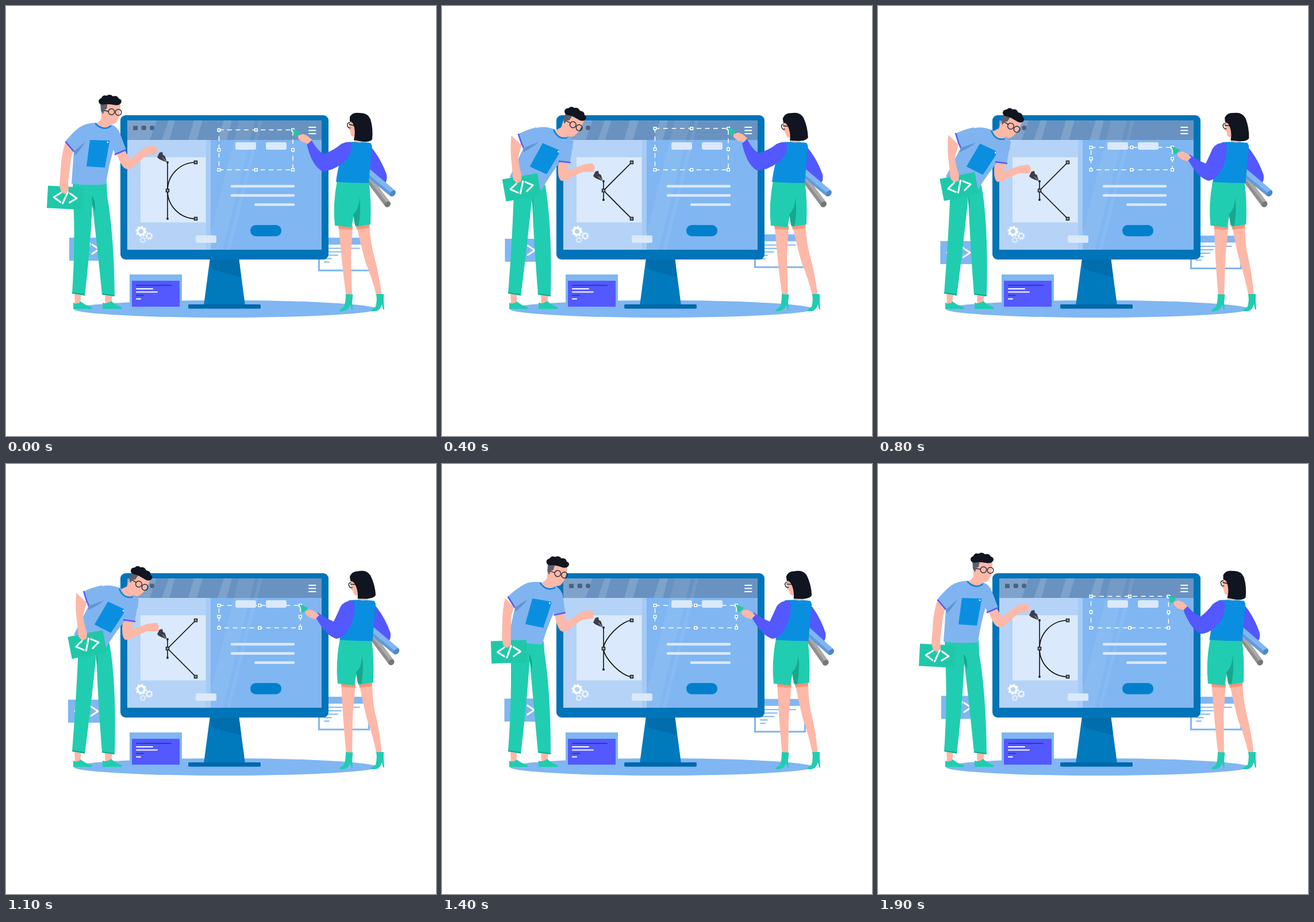
These frames come from a looping animation (748 by 748 pixels, 2000 ms). An HTML page:

```html
<!DOCTYPE html>
<html lang="en">
<head>
<meta charset="utf-8">
<title>Design team at work</title>
<style>
html, body { margin: 0; width: 100%; height: 100%; overflow: hidden; background: #fff; }
svg { display: block; width: 100vw; height: 100vh; }
.sky { fill: #80b6f2; }
.shirt { fill: #80b4f0; }
.pale { fill: #dae9fb; }
.vest { fill: #0a8fe0; }
.violet { fill: #5358ff; }
.teal { fill: #20cdb0; }
.deep { fill: #17a78f; }
.skin { fill: #fdb8a8; }
.shade { fill: #fb9477; }
.ink { fill: #10151f; }
.line { fill: none; stroke-linecap: round; stroke-linejoin: round; }
.white { stroke: #fff; }
.cuff { fill: none; stroke: #5358ff; stroke-width: 2.5; }
.node { fill: #8a97a6; stroke: #14181f; stroke-width: 1.4; }
</style>
</head>
<body>
<svg viewBox="0 0 748 748">
  <defs>
    <clipPath id="glass"><rect x="211" y="199" width="338" height="225"/></clipPath>
    <g id="code" class="line white" stroke-width="3">
      <path d="M-8 -8L-20 0L-8 8M4 -10L-4 10M8 -8L20 0L8 8"/>
    </g>
  </defs>

  <ellipse class="sky" cx="381" cy="527" rx="263" ry="15"/>

  <g>
    <rect class="sky" x="215" y="467" width="91" height="56"/>
    <rect class="violet" x="219" y="478" width="83" height="45"/>
    <path class="line" stroke="#1746b5" stroke-width="2" d="M227 486H287M227 503.500H239"/>
    <path class="line white" stroke-width="2" d="M227 492H255M227 497.500H263M227 509.500H234"/>
  </g>

  <g id="codePanel">
    <rect class="sky" width="57" height="40"/>
    <use href="#code" x="32" y="20"/>
  </g>

  <g id="page">
    <rect x="1.500" y="2" width="87" height="55" fill="#fff" stroke="#80b6f2" stroke-width="3"/>
    <rect class="sky" width="90" height="12"/>
    <path class="line" stroke="#80b6f2" stroke-width="2" d="M11 18.500H72M11 24.500H40M11 30.500H34M11 36.500H23M11 42.500H19"/>
  </g>

  <!-- monitor -->
  <path fill="#0079bd" d="M355 438H405L416 521H344Z"/>
  <path fill="#006dad" d="M355 438H405L409 472L358 458Z"/>
  <rect fill="#0068a8" x="317" y="519" width="126" height="7.500" rx="2"/>
  <rect fill="#0074b8" x="199" y="190" width="362" height="251" rx="9"/>
  <g clip-path="url(#glass)">
    <rect class="sky" x="211" y="199" width="338" height="225"/>
    <rect fill="#b4d3f7" x="211" y="233" width="145" height="191"/>
    <rect fill="#a5caf5" x="348" y="233" width="8" height="191"/>
    <rect fill="#6992c1" x="211" y="199" width="338" height="34"/>
    <g fill="#fff">
      <path opacity=".15" d="M211 199H262L250 233H211ZM283 199H294L284 233H271ZM327 199H342L332 233H317ZM379 199H393L384 233H368Z"/>
      <path opacity=".07" d="M405 199H433L377 424H349ZM440 199H446L390 424H384Z"/>
    </g>
    <g fill="#4d627f">
      <rect x="221" y="208.500" width="8" height="7.500"/>
      <rect x="235.500" y="208" width="8.500" height="8" rx="3"/>
      <circle cx="254" cy="212" r="4"/>
    </g>
    <path class="line white" stroke-width="2" d="M527 211H538.500M527 216.500H538.500M527 222H538.500"/>
    <rect class="pale" x="234" y="263" width="113.500" height="113.500"/>
    <g fill="none" stroke="#fff">
      <g id="gears"></g>
    </g>
    <rect class="pale" x="330" y="399" width="36" height="13" rx="3"/>
    <path class="line" stroke="#dae9fb" stroke-width="4.500" d="M393 313.500H500M393 329.500H500M434 345.500H500"/>
    <rect fill="#0080cc" x="425" y="381" width="54" height="19.500" rx="9.500"/>
  </g>

  <rect id="selection" x="370.500" fill="none" stroke="#fff" stroke-width="1.500" stroke-dasharray="8 6.500"/>
  <rect class="pale" x="399" y="237" width="36" height="13" rx="3"/>
  <rect class="pale" x="452" y="237" width="36" height="13" rx="3"/>
  <g id="handles"></g>

  <path id="curve" class="line" stroke="#111" stroke-width="1.700"/>
  <path id="lever" class="line" stroke="#111" stroke-width="1.600"/>
  <g id="leverEnds" fill="#111"><circle cx="281" r="1.900"/><circle cx="281" r="1.900"/></g>
  <g class="node">
    <rect x="278.500" y="318.500" width="5" height="5"/>
    <rect x="327.500" y="269.500" width="5" height="5"/>
    <rect x="327.500" y="367.500" width="5" height="5"/>
  </g>

  <!-- woman -->
  <g>
    <path class="skin" data-k="hip" d="M578 378L603 378Q602 400 600 435L602 506L592 506Q587 470 584 440Z" data-to="M584 378L609 378Q608 400 604 435L602 506L592 506Q589 470 587 440Z"/>
    <path class="skin" data-k="hip" d="M609 378L632 378Q634 410 639 430Q649 465 654 506L645 506Q636 470 626 448Q618 420 609 378Z" data-to="M615 378L638 378Q638 410 642 430Q651 465 654 506L645 506Q638 470 630 448Q622 420 615 378Z"/>
    <path class="teal" d="M591 501L603.500 502L602 516L603 528H601L599 520Q594 531 586 531H580Q580 528 588 523Q591 515 591 501Z"/>
    <path class="teal" d="M644 501L657 501L657 514L658 528H656L654 519Q650 531 642 531H634Q636 527 643 523Q646 512 644 501Z"/>
    <g id="shorts">
      <path class="shade" d="M578 381L603 383L603 389L579 388ZM609 383L632 380V386L610 389Z"/>
      <path class="teal" d="M576 304H631Q636 340 634 380L608 384L605 364L601 385L572 382Q568 345 576 304Z"/>
      <path class="deep" d="M615 332Q614 354 604 362L607 381L613 383Q618 360 615 332Z"/>
    </g>
    <g id="upper">
      <g id="rearArm">
        <path class="violet" d="M634 244Q652 265 662 293Q664 304 658 310L648 314L626 288Z"/>
        <path fill="#aaa" d="M622 298L629 289L668 341L660 349Z"/>
        <path fill="#8f8f8f" d="M622 298L625 294L664 345L660 349Z"/>
        <ellipse fill="#777" cx="664" cy="345" rx="4.500" ry="5.500" transform="rotate(45 664 345)"/>
        <path class="sky" d="M624 294L632 283L677 321L669 331Z"/>
        <path fill="#639ad9" d="M624 294L627 290L672 327L669 331Z"/>
        <ellipse fill="#4f87c8" cx="673" cy="326" rx="4" ry="6" transform="rotate(38 673 326)"/>
      </g>
      <path class="vest" d="M590 237Q612 235 634 238Q638 243 636 250L631 308Q602 308 574 306Q577 280 590 237Z"/>
      <path class="skin" d="M605 222H624V235Q615 240 605 235Z"/>
      <g id="womanHead">
        <path class="skin" d="M600 196Q596 207 597 211L596 215L599 217Q599 226 603 227L610 229L614 198Z"/>
        <path class="line" stroke="#151515" stroke-width="1.300" d="M598 203Q593 203 594 208T599 212M597 206L606 208"/>
        <path class="ink" d="M598 193Q603 184 614 186Q629 185 634 197Q639 214 637 232Q634 237 621 236L605 233Q608 222 606 212Q604 201 598 201Z"/>
      </g>
    </g>
    <path class="violet" data-k="sel" d="M531 232Q540 250 551 256Q570 250 582 240Q592 235 600 238Q603 260 585 272Q566 286 548 286Q530 276 522 239Z" data-to="M542 258Q555 268 570 274Q576 262 582 248Q590 236 606 238Q609 263 598 284Q589 302 575 304Q558 300 540 269Z"/>
  </g>
  <g id="pointer">
    <path class="skin" d="M9 10L17 7L25 10L33 17L26 24L16 21L9 15Z"/>
    <path fill="#25c79f" d="M-1 -2L13 4L10 8L4 13Z"/>
  </g>

  <!-- man -->
  <path class="skin" d="M119 500H131L129 518H120ZM172 503H185L183 518H173Z"/>
  <path class="teal" d="M117 516Q124 520 130 514Q137 520 149 524V527H117ZM168 516Q175 519 183 513Q190 520 201 524V527H168Z"/>
  <path class="teal" data-k="man" d="M116 306L175 306L176 330Q188 400 189 505L167 502Q158 410 150 346Q147 420 137 504L115 500Q121 410 117 340Z" data-to="M127 290L180 312L183 330Q192 400 189 505L167 502Q160 410 157 332Q148 420 137 504L115 500Q122 410 125 340Z"/>
  <path class="deep" data-k="man" d="M149 331Q156 336 155 358L150 346Z" data-to="M157 330Q160 338 159 354L157 340Z"/>
  <path class="deep" d="M115 498L137 501V503L115 500ZM167 500L189 503V505L167 502Z"/>
  <path class="skin" data-k="man" d="M192 254C196 268 203 285 213 284C224 281 238 263 246 259L262 257L263 247L256 242L242 246C232 252 224 262 217 266C212 262 209 256 206 248Z" data-to="M204 270C201 285 201 303 208 306C218 306 236 293 246 291L264 291L266 282L262 276L246 278C238 281 226 286 219 287C219 282 221 278 222 272Z"/>
  <g class="torso">
    <path class="shirt" d="M155 203Q138 204 128 211Q114 222 103 237L118 253Q116 280 114 309Q144 313 174 310Q178 280 187 250L198 222Q194 210 183 206Z"/>
    <path fill="#6394d2" d="M118 253Q128 244 139 234Q133 246 120 260Z"/>
    <path class="cuff" d="M103.500 236L118 253"/>
    <path class="vest" d="M146 233L180.500 234L172 281L140 279Z"/>
    <circle cx="177" cy="237" r="1.300" fill="#fff"/>
  </g>
  <path class="shirt" data-k="man" d="M184 208Q195 213 198 221L209 250L190 258L180 232Z" data-to="M212 226Q228 231 231 236L224 273L205 271L205 242Z"/>
  <path class="cuff" data-k="man" d="M189 258.500L209 250" data-to="M204 271L225 274"/>
  <g class="torso">
    <path class="skin" d="M165 176L166 196L158 205Q170 216 181 209L181 205Q187 207 191 203Q199 195 199 171L176 167Z"/>
    <path class="line" stroke="#0a86d8" stroke-width="2.500" d="M156 205Q169 218 182 209"/>
    <path fill="#5d5f69" d="M164 168L177 168L175 179L171 181L169 188L165 182Z"/>
    <path class="ink" d="M162 169Q159 163 166 160Q168 154 175 156Q181 152 186 157Q194 155 196 161Q203 163 200 169Q196 174 188 172Q176 170 172 171Q165 173 162 169Z"/>
    <g class="line" stroke="#2b2b33" stroke-width="1.400">
      <circle cx="183.500" cy="184" r="5.300"/><circle cx="195.500" cy="185" r="5.300"/>
      <path d="M171 182L178 183"/>
    </g>
  </g>
  <g id="board">
    <rect x="-31" y="-19.500" width="62" height="39" fill="#1fc8a9"/>
    <use href="#code"/>
  </g>
  <path class="skin" data-k="man" d="M103 238Q96 260 95 285L93 312L96 324L103 327L109 321L108 306Q111 285 113 265L117 253Z" data-to="M122 224Q120 250 123 270L125 288L126 300L132 307L140 304L141 294Q136 280 134 264L140 241Z"/>
  <path class="shirt" data-k="man" d="M128 211Q114 222 103 236L118 253L138 236Z" data-to="M167 211Q148 215 135 222L141 241L168 235Z"/>
  <path class="cuff" data-k="man" d="M103.500 236L118 253" data-to="M135 221L141 241"/>
  <g id="nib">
    <path fill="#3c3d47" d="M0 0L-3.500 -11L-7 -13L-8 -18L-13 -17L-17 -9L-14 -6L-10 -4Z"/>
    <path class="line" stroke="#d8dde4" stroke-width=".9" d="M-1 -1L-7.500 -8"/>
  </g>
</svg>
<script>
const LOOP = 2000, STEP = 100;
const $ = id => document.getElementById(id);
const put = (el, attrs) => { for (const name in attrs) el.setAttribute(name, attrs[name]); };
const move = (id, x, y, turn = 0, px = 0, py = 0) =>
  put($(id), { transform: `translate(${x} ${y}) rotate(${turn} ${px} ${py})` });
const add = (parent, tag, attrs) => {
  const el = document.createElementNS('http://www.w3.org/2000/svg', tag);
  put(el, attrs);
  return parent.appendChild(el);
};

const ease = u => { u = Math.min(1, Math.max(0, u)); return u * u * (3 - 2 * u); };

// Eased value through [time, value] stops.
function through(t, stops) {
  const i = stops.findIndex(s => s[0] > t);
  const [t0, v0] = stops[i - 1], [t1, v1] = stops[i];
  return v0 + (v1 - v0) * ease((t - t0) / (t1 - t0));
}

const numbers = /-?\d+(\.\d+)?/g;
const morphs = [...document.querySelectorAll('[data-to]')].map(el => ({
  el, from: el.getAttribute('d'), to: el.dataset.to.match(numbers).map(Number), key: el.dataset.k
}));
function morph({ el, from, to, key }, pose) {
  let i = 0;
  put(el, { d: from.replace(numbers, n => (+n + (to[i++] - n) * pose[key]).toFixed(2)) });
}

for (const [cx, cy, r, opacity] of [[235, 392, 6, 1], [249, 400, 4.2, .75], [238, 407, 3.6, .55]]) {
  add($('gears'), 'circle', { cx, cy, r, opacity, 'stroke-width': r * .6 });
  add($('gears'), 'circle', { cx, cy, r: r * 1.4, opacity, 'stroke-width': r * .4, pathLength: 16, 'stroke-dasharray': '1 1' });
}

const spots = [[0, 0], [.5, 0], [1, 0], [0, .5], [1, .5], [0, 1], [.5, 1], [1, 1]].map(([u, v]) => {
  const g = add($('handles'), 'g', {});
  add(g, 'rect', { x: -3, y: -3, width: 6, height: 6, fill: '#fff' });
  add(g, 'rect', { x: -1.3, y: -1.3, width: 2.6, height: 2.6, fill: '#4aa8b4' });
  return { g, u, v };
});

function drawSelection(sel) {
  const left = 370.5, bottom = 285, top = 213 + 33 * sel, right = 498 + 14 * sel;
  put($('selection'), { y: top, width: right - left, height: bottom - top });
  for (const { g, u, v } of spots)
    put(g, { transform: `translate(${left + (right - left) * u} ${top + (bottom - top) * v})` });
  move('pointer', right, top);
}

function drawCurve(man) {
  const bend = 1 - Math.min(1, man / .93), reach = 16 + 33 * bend, c = 27 * bend;
  put($('curve'), { d: `M330 272C${330 - c} 272 281 ${321 - c} 281 321C281 ${321 + c} ${330 - c} 370 330 370` });
  put($('lever'), { d: `M281 ${321 - reach}V${321 + reach}` });
  const [upper, lower] = $('leverEnds').children;
  put(upper, { cy: 321 - reach });
  put(lower, { cy: 321 + reach });
  move('nib', 280, 321 - reach);
}

function draw(t) {
  const phase = 2 * Math.PI * t / LOOP;
  const man = t < 1100 ? ease(t / 480) : 1 - ease((t - 1100) / 500);
  const drop = ease(((t < 400 ? t + LOOP : t) - 1760) / 290);
  const sel = t < 400 ? 1 - drop : t < 1760 ? ease((t - 400) / 200) : 1 - drop;
  const sway = through(t, [[0, 0], [400, 0], [600, 11], [800, 8.5], [1100, 6.5], [1700, 6.5], [2050, 0]]);
  const nod = through(t, [[0, 0], [400, -8], [600, -3], [800, -5], [1100, -10], [1300, -12], [1600, 0], [2050, 0]]);
  const swing = through(t, [[0, 0], [400, 0], [600, -3], [800, 0], [1100, 0], [1600, 2.5], [2100, 0]]);

  const pose = { man, sel, hip: sway * .75 / 6 };
  morphs.forEach(m => morph(m, pose));
  for (const el of document.querySelectorAll('.torso'))
    put(el, { transform: `rotate(${23 * man} 146 313)` });
  move('board', 103 + 38.500 * man, 333.500 - 19.500 * man, 3 - 14 * man);
  move('shorts', sway * .75, 0);
  move('upper', sway, 0);
  move('womanHead', 0, 0, nod, 613, 232);
  move('rearArm', 0, 0, swing, 636, 242);

  const lag = Math.cos(phase - .157);
  move('codePanel', 109 + lag, 406.5 - 3.5 * lag);
  move('page', 543, 403 - 6 * Math.sin(phase));
  drawSelection(sel);
  drawCurve(man);
}

const start = performance.now();
function tick() {
  const t = (performance.now() - start) % LOOP;
  draw(Math.floor(t / STEP) * STEP);
  requestAnimationFrame(tick);
}
tick();
</script>
</body>
</html>
```
